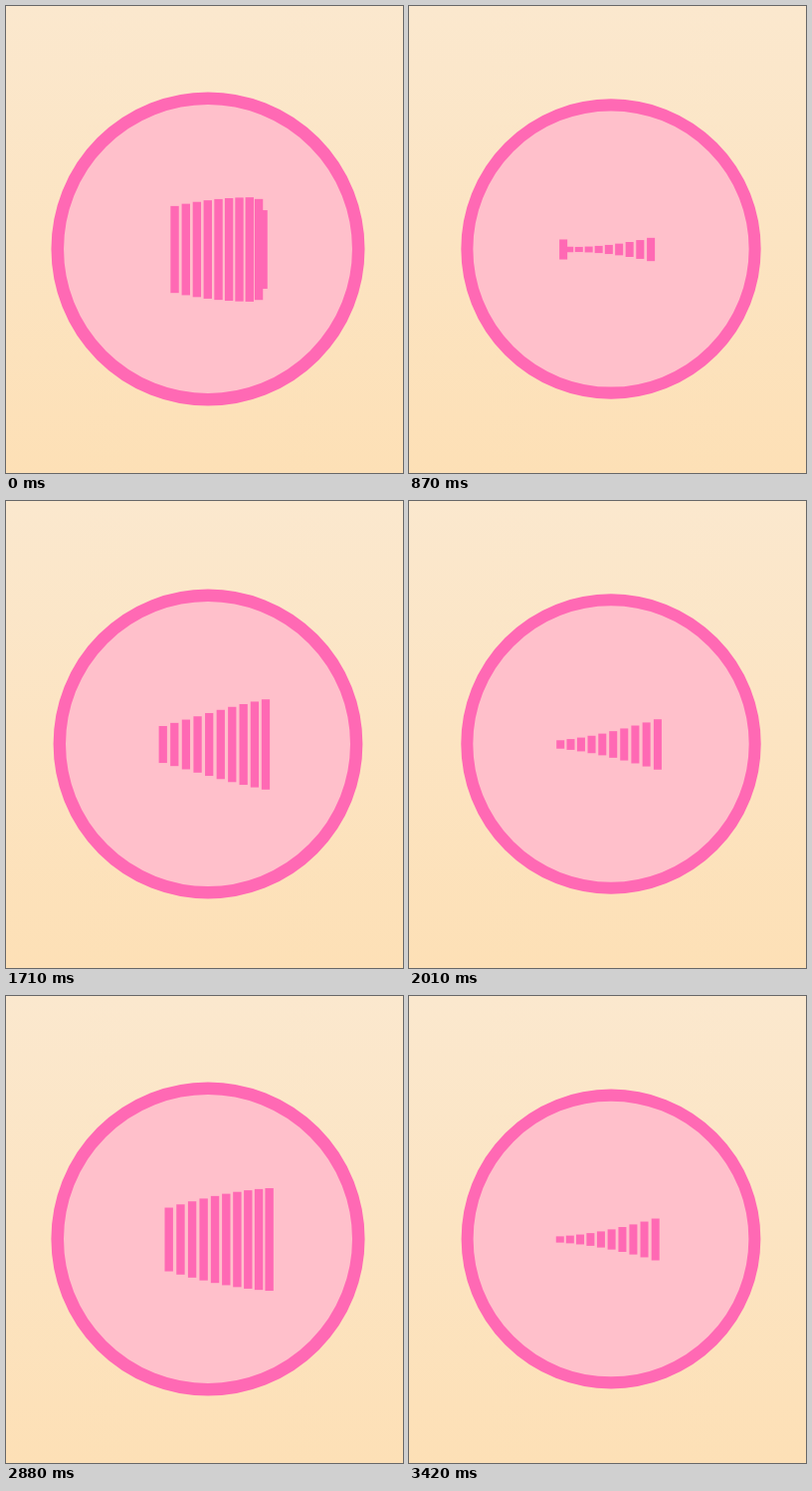
These frames come from a looping animation (399 px wide and 469 px high, 3450 ms). An HTML page with a canvas:

```html
<!DOCTYPE html>
<html lang="en">
<head>
<meta charset="utf-8">
<title>Pulsing bars</title>
<style>
  html, body { margin: 0; width: 100%; height: 100%; overflow: hidden; }
  canvas { display: block; }
</style>
</head>
<body>
<canvas id="stage" width="399" height="469"></canvas>
<script>
const ctx = document.getElementById('stage').getContext('2d');
const LOOP = 3450, STEP = 30, PERIOD = 1350;
const BARS = 10, DELAY = 1 / 30, RISE = 0.15;

const sky = ctx.createLinearGradient(0, 0, 0, 469);
sky.addColorStop(0, '#fbe8ce');
sky.addColorStop(1, '#fde0b6');

// cubic-bezier(.42, 0, .58, 1)
function easeInOut(x) {
  let lo = 0, hi = 1, s = 0.5;
  for (let i = 0; i < 24; i++) {
    s = (lo + hi) / 2;
    const bx = 3 * (1 - s) * s * (0.42 * (1 - s) + 0.58 * s) + s ** 3;
    if (bx < x) lo = s; else hi = s;
  }
  return s * s * (3 - 2 * s);
}

// Eases 0 to 1 until `peak`, then back to 0 at the end of the cycle
function pulse(phase, peak) {
  const p = phase - Math.floor(phase);
  return easeInOut(p < peak ? p / peak : (1 - p) / (1 - peak));
}

function draw(time) {
  const phase = 0.397 + time / PERIOD;
  const scale = 1 + 0.05 * pulse(phase + DELAY, 0.5);

  ctx.setTransform(1, 0, 0, 1, 0, 0);
  ctx.fillStyle = sky;
  ctx.fillRect(0, 0, 399, 469);

  ctx.translate(203, 244);
  ctx.scale(scale, scale);
  ctx.beginPath();
  ctx.arc(0, 0, 144.3, 0, 2 * Math.PI);
  ctx.fillStyle = '#ffc0cb';
  ctx.fill();
  ctx.lineWidth = 12;
  ctx.strokeStyle = '#ff69b4';
  ctx.stroke();

  ctx.fillStyle = '#ff69b4';
  for (let i = 0; i < BARS; i++) {
    const k = pulse(phase - i * DELAY, RISE);
    const height = 5 + 95 * k;
    ctx.fillRect(-55.5 + 9.66 * i + 23.75 * k, 0.5 - height / 2, 8, height);
  }
}

function tick() {
  const time = performance.now() % LOOP;
  draw(Math.floor(time / STEP) * STEP);
  requestAnimationFrame(tick);
}
tick();
</script>
</body>
</html>
```
